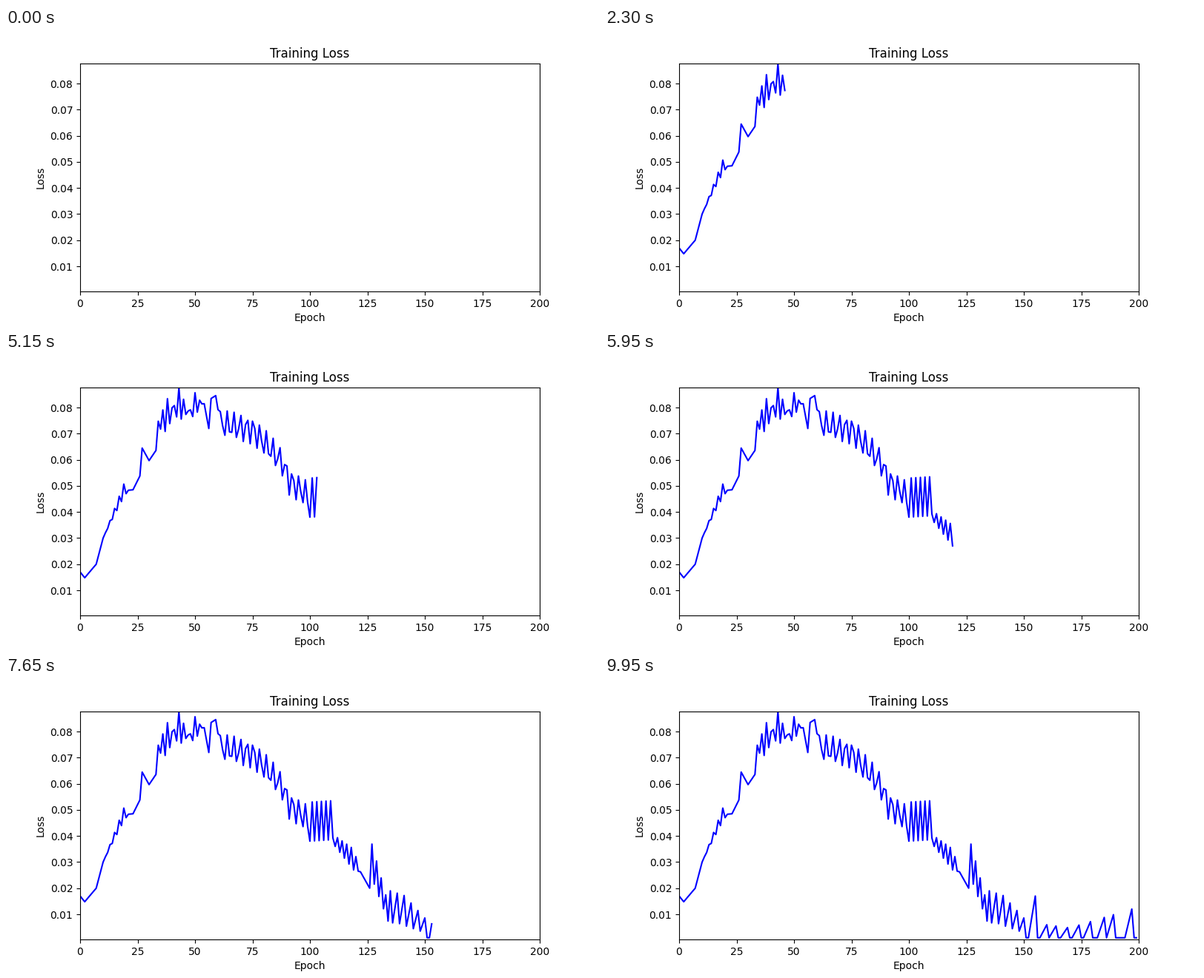
A matplotlib script that plays this animation: 800 by 400 pixels, repeating every 10000 ms.

```python
import matplotlib.pyplot as plt
import numpy as np
from matplotlib.animation import FuncAnimation

EPOCHS = 200
INTERVAL = 50  # ms
SETTLE = 135   # epoch from which only spikes remain

epochs = np.arange(EPOCHS)


def through(points):
    """Straight lines through (epoch, value) key points."""
    x, y = zip(*points)
    return np.interp(epochs, x, y)


def spike(peak):
    """Rise over three epochs, then drop at once."""
    return np.interp(epochs, [peak - 3, peak, peak + 1], [0, 1, 0])


def make_loss():
    # All heights are in units of 1e-4
    trend = through([
        (0, 170), (2, 148), (7, 200), (10, 300), (19, 482), (23, 485),
        (26, 538), (27, 645), (30, 597), (33, 636), (34, 735), (43, 812),
        (48, 778), (50, 812), (54, 815), (56, 720), (57, 835), (59, 846),
        (61, 738), (75, 715), (88, 590), (91, 520), (100, 455), (109, 460),
        (111, 380), (119, 310), (126, 200), (127, 304), (134, 108),
    ])

    # Signed zigzag: positive lifts even epochs, negative lifts odd ones
    swing = through([
        (11, 0), (19, -25), (21, 0), (33, 0), (38, 65), (43, -65),
        (50, 45), (53, 0), (99, 0), (100, -75), (109, -75), (111, 20),
        (119, 40), (122, 0), (126, 0), (127, -65), (134, -34),
    ])
    beat = -55 * np.cos(2 * np.pi * (epochs - 74) / 6.8)
    swing += np.where((epochs >= 61) & (epochs < 100), beat, 0)
    rising = trend + swing * (-1.0) ** epochs

    height = through([(135, 180), (141, 162), (150, 76), (155, 160),
                      (160, 50), (170, 38), (197, 110)])
    peaks = [*range(SETTLE, 151, 3), 155, 160, 164, 169, 174, 179, 185, 189, 197]
    spikes = 10 + sum(height[p] * spike(p) for p in peaks)

    return np.where(epochs < SETTLE, rising, spikes) * 1e-4


loss = make_loss()

fig, ax = plt.subplots(figsize=(8, 4), dpi=100)
ax.set_xlim(0, EPOCHS)
ax.set_ylim(0.00036, 0.0877)
ax.set_title("Training Loss")
ax.set_xlabel("Epoch")
ax.set_ylabel("Loss")
line, = ax.plot([], [], color="blue", lw=1.5)


def init():
    line.set_data([], [])
    return line,


def update(frame):
    line.set_data(epochs[:frame + 1], loss[:frame + 1])
    return line,


anim = FuncAnimation(fig, update, frames=EPOCHS, init_func=init,
                     interval=INTERVAL, repeat=True, repeat_delay=0)
plt.show()
```
